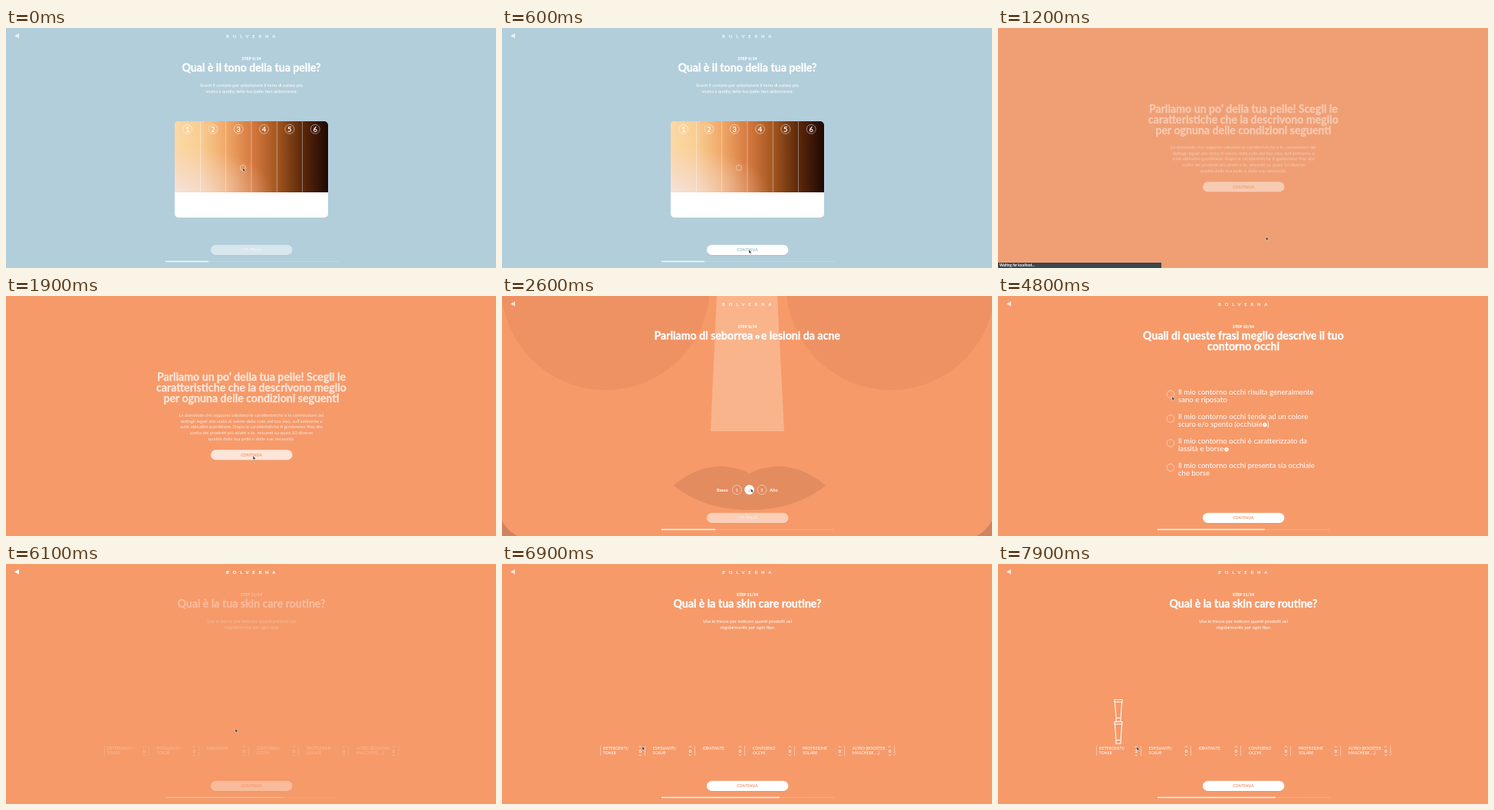
These frames come from a looping animation (639x314 px, 8 s). An HTML page:

```html
<!DOCTYPE html>
<html lang="it">
<head>
<meta charset="utf-8">
<title>Skin quiz</title>
<style>
html, body { margin: 0; width: 100%; height: 100%; overflow: hidden; background: #b2cedb; }
svg { display: block; width: 100vw; height: 100vh; }
text { font-family: Lato, "Open Sans", sans-serif; fill: #fff; white-space: pre; }
.title { font-size: 14.15px; font-weight: 700; stroke: #fff; stroke-width: .3px; }
</style>
</head>
<body>
<svg id="stage" viewBox="0 0 639 314" preserveAspectRatio="none"></svg>
<script>
const LOOP = 8000, ORANGE = '#f69a6a', PALE = '#f9b48b';
const stage = document.getElementById('stage');

// ---- markup helpers ----
const text = (x, y, size, s, o = {}) =>
  `<text x="${x}" y="${y}" font-size="${size}" font-weight="${o.w || 400}" text-anchor="${o.a || 'start'}"
    style="fill:${o.f || '#fff'};letter-spacing:${o.ls || 0}px" ${o.id ? `id="${o.id}"` : ''}>${s}</text>`;
const mid = (y, size, s, w = 400) => text(320, y, size, s, { a: 'middle', w });
const circle = (x, y, r, attrs = 'fill="#fff"') => `<circle cx="${x}" cy="${y}" r="${r}" ${attrs}/>`;
const ring = (x, y, r) => circle(x, y, r, 'fill="none" stroke="#fff" stroke-width=".6" opacity=".8"');
const rect = (x, y, w, h, attrs) => `<rect x="${x}" y="${y}" width="${w}" height="${h}" ${attrs}/>`;
const path = (d, attrs) => `<path d="${d}" ${attrs}/>`;
const group = (id, body, attrs = '') => `<g id="${id}" ${attrs}>${body}</g>`;
const each = (list, fn) => list.map(fn).join('');
const info = (x, y) => circle(x, y, 2.7) + text(x, y + 1.6, 4.4, 'i', { a: 'middle', w: 900, f: ORANGE });
const heading = (x, y, s, anchor = 'middle') => `<text class="title" x="${x}" y="${y}" text-anchor="${anchor}">${s}</text>`;
const title = (lines, y = 57.3) => each(lines, (s, i) => heading(320, y + 14 * i, s));
const note = (lines, y = 76.5, gap = 8) => each(lines, (s, i) => mid(y + gap * i, 6, s));
const step = n => mid(41.8, 5.2, `STEP ${n}/14`, 900) +
  rect(208, 305, 225, 1, 'fill="#fff" opacity=".18"') + rect(208, 304.7, 14 * n, 1.5, 'fill="#fff" opacity=".85"');
const caption = (y, f) => text(320, y + 8.5, 5.2, 'CONTINUA', { a: 'middle', w: 700, f });
const button = (id, y, color = '#ee9a70') => group(id,
  rect(267, y + .8, 106.5, 13.2, 'rx="6.6" fill="#7a4a30" opacity=".14"') +
  rect(267, y, 106.5, 13.2, 'rx="6.6" fill="#fff"') + caption(y, color));
// A disabled button carries a white caption that fades as it becomes active.
const lockedButton = (id, y, color) => button(id, y, color) + group(id + 'Hint', caption(y, '#fff'));

// ---- screens ----
function toneScreen() {
  const tones = ['#fcd9a6', '#f9cd93', '#efa868', '#d67a41', '#a4561f', '#5b280b', '#200802'];
  const edge = i => 220 + 33.3 * i;
  return `<defs>
    <linearGradient id="tones">${each(tones, (c, i) => `<stop offset="${i / 6}" stop-color="${c}"/>`)}</linearGradient>
    <radialGradient id="blush" cx="0" cy="1" r=".65"><stop stop-color="#f4e2e4" stop-opacity=".85"/>
      <stop offset="1" stop-color="#f4d8d0" stop-opacity="0"/></radialGradient>
    <clipPath id="card">${rect(220, 122, 200, 126, 'rx="5"')}</clipPath></defs>` +
    step(4) + title(['Qual è il tono della tua pelle?']) +
    note(['Scorri il cursore per selezionare il tono di colore più',
      'vicino a quello della tua pelle non abbronzata.']) +
    `<g clip-path="url(#card)">${rect(220, 122, 200, 126, 'fill="#fff"') +
      rect(220, 122, 200, 93, 'fill="url(#tones)"') + rect(220, 122, 200, 93, 'fill="url(#blush)"')}</g>` +
    each([1, 2, 3, 4, 5], i => rect(edge(i) - .3, 122, .6, 93, 'fill="#fff" opacity=".65"')) +
    each([1, 2, 3, 4, 5, 6], i => ring(edge(i - .5), 132.3, 6) +
      text(edge(i - .5), 135.7, 9.5, i, { a: 'middle', w: 700 })) +
    ring(309, 183, 3.7) + lockedButton('toneBtn', 283.8, '#9cbfcf');
}

function introScreen() {
  return title(["Parliamo un po' della tua pelle! Scegli le", 'caratteristiche che la descrivono meglio',
    'per ognuna delle condizioni seguenti'], 110.5) +
    note(['Le domande che seguono valutano le caratteristiche e le connessioni dei',
      'dettagli legati allo stato di salute della cute del tuo viso, sull’ambiente e',
      'sulle abitudini quotidiane. Dopo le caratteristiche ti guideremo fino alla',
      'scelta dei prodotti più adatti a te, misurati su quasi 10 diverse',
      'qualità della tua pelle e delle sue necessità.'], 157.7, 7.8) +
    button('introBtn', 201.3);
}

function acneScreen() {
  const pore = (x, y, strong) => strong
    ? circle(x, y, 1.2, 'fill="#b86a49" stroke="#74402c" stroke-width=".9"')
    : circle(x, y, .65, 'fill="#b06a48"');
  // y, first/last strong column, first/last faint column
  const rows = [[104, 9, 0, 3, 4], [114, 9, 0, 2, 5], [124, 3, 4, 2, 5], [134, 2, 5, 2, 6],
    [146, 2, 5, 0, 7], [156, 1, 6, 0, 7], [166, 0, 7, 0, 7]];
  const nose = each(rows, ([y, a, b, c, d]) => each([0, 1, 2, 3, 4, 5, 6, 7], i =>
    i < c || i > d ? '' : pore(282.3 + 10.3 * i, y, i >= a && i <= b)));
  const cheeks = each([242, 377], x => each([0, 1, 2], i =>
    each([157, 167, 177], y => pore(x + 10.4 * i, y, true))));
  const spots = each([0, 453], x => each([[93.5, 174], [81.5, 196.5], [106.5, 196.5]],
    ([a, y]) => circle(x + a, y, 5.2, `fill="${PALE}"`)));
  return each([135, 507], x => circle(x, -13, 136, 'fill="#ee9264"')) +
    path('M280 0H359L368 177H272Z', `fill="${PALE}"`) +
    path('M224 248C245 229 270 222 288 223C304 224 313 227 323 232.5C333 227 342 224 358 223C376 222 401 229 422 248C396 269 362 280 323 280S250 269 224 248Z', 'fill="#e38c60"') +
    path('M0 294Q7 307 20 314H0ZM639 294Q632 307 619 314H639Z', 'fill="#cf845f"') +
    step(5) + heading(198.5, 57.3, 'Parliamo di seborrea', 'start') + info(333, 53.5) +
    heading(441, 57.3, 'e lesioni da acne', 'end') +
    group('detail', nose + cheeks + spots + circle(309, 150.5, 4, 'fill="#fbc5a3"') +
      mid(208.6, 8.2, 'La mia pelle è seborroica con aspetto traslucido e presenza') +
      text(255, 218.6, 8.2, 'diffusa di brufoli (papule o pustole') + info(379.6, 216) + text(382.5, 218.6, 8.2, ')')) +
    text(280, 255.5, 5.7, 'Basso', { w: 700 }) + text(349, 255.5, 5.7, 'Alto', { w: 700 }) +
    each([1, 2, 3], i => ring(290 + 16.3 * i, 253.5, 6)) + circle(322.6, 253.5, 6.2, 'id="level" fill="#fff"') +
    each([1, 2, 3], i => text(290 + 16.3 * i, 255.8, 6.3, i, { a: 'middle', f: i == 2 ? '#f3ab84' : '#fff' })) +
    lockedButton('acneBtn', 283.8);
}

function eyeScreen() {
  const options = [['Il mio contorno occhi risulta generalmente', 'sano e riposato'],
    ['Il mio contorno occhi tende ad un colore', 'scuro e/o spento (occhiaie'],
    ['Il mio contorno occhi è caratterizzato da', 'lassità e borse'],
    ['Il mio contorno occhi presenta sia occhiaie', 'che borse']];
  return step(10) + title(['Quali di queste frasi meglio descrive il tuo', 'contorno occhi']) +
    each(options, (lines, i) => ring(225, 128.5 + 32 * i, 4.8) +
      each(lines, (s, k) => text(235, 128.6 + 32 * i + 10.6 * k, 9.6, s))) +
    info(348, 168.5) + text(351, 171.2, 9.6, ')') + info(298, 200.8) +
    circle(225, 128.5, 3, 'id="choice" fill="#fff"') + button('eyeBtn', 283.8);
}

function routineScreen() {
  const types = [['DETERGENTI/', 'TONER'], ['ESFOLIANTI/', 'SCRUB'], ['IDRATANTE'], ['CONTORNO', 'OCCHI'],
    ['PROTEZIONE', 'SOLARE'], ['ALTRO (BOOSTER,', 'MASCHERE, ...)']];
  const line = 'fill="none" stroke="#fff" stroke-width=".7"';
  const bottle = (id, y) => group(id, path(`M152 ${y}h10v3h-10zM152.4 ${y + 3}l1.6 21h6l1.6 -21M154 ${y + 24}v4.5h6v-4.5`,
    'fill="none" stroke="#fff" stroke-width="1.1"'));
  return step(11) + title(['Qual è la tua skin care routine?']) +
    note(['Usa le frecce per indicare quanti prodotti usi', 'regolarmente per ogni tipo']) +
    rect(128, 238, .6, 13, 'fill="#fff" opacity=".7"') +
    each(types, (lines, i) => {
      const x = 131.5 + 65.1 * i;
      return each(lines, (s, k) => text(x, 243 + 6.4 * k, 5.2, s)) +
        path(`M${x + 47} 240l1.7 -1.7l1.7 1.7M${x + 47} 249.3l1.7 1.7l1.7 -1.7`, line) +
        text(x + 48.7, 246.5, 5.4, 0, { a: 'middle', w: 700, id: 'count' + i }) +
        rect(x + 54.6, 238, .6, 13, 'fill="#fff" opacity=".7"');
    }) + bottle('bottle1', 206.5) + bottle('bottle2', 177.5) + button('routineBtn', 283.8);
}

stage.innerHTML = rect(0, 0, 639, 314, 'id="bg"') +
  group('tone', toneScreen()) + group('intro', introScreen()) + group('acne', acneScreen()) +
  group('eye', eyeScreen()) + group('routine', routineScreen()) +
  group('head', path('M11 10.3L17 7V13.6Z', 'fill="#fff"') +
    text(287, 13.4, 5.9, 'BOLVERNA', { w: 900, ls: 4.7 })) +
  group('status', rect(0, 307, 213, 7, 'fill="#3b464d"') + text(2, 312.3, 4.6, 'Waiting for localhost...', { w: 700 })) +
  group('cursor', path('M0 0V5L1.2 4L2.1 6L3 5.6L2.1 3.7H3.7Z', 'fill="#222" stroke="#fff" stroke-width=".5"'));

const el = {};
stage.querySelectorAll('[id]').forEach(n => el[n.id] = n);

// ---- timing ----
// Keys are [time, value...]; values between keys are interpolated.
function track(t, keys, ease = k => k) {
  const i = keys.findIndex(k => k[0] > t);
  if (i < 0) return keys[keys.length - 1].slice(1);
  if (!i) return keys[0].slice(1);
  const a = keys[i - 1], b = keys[i], k = ease((t - a[0]) / (b[0] - a[0]));
  return a.slice(1).map((v, j) => v + (b[j + 1] - v) * k);
}
const smooth = k => k * k * (3 - 2 * k);

const fades = {
  tone: [[700, 1], [950, 0]],
  intro: [[1000, 0], [1450, 1], [1850, 1], [2050, 0]],
  acne: [[2050, 0], [2400, 1], [4050, 1], [4250, 0]],
  eye: [[4250, 0], [4550, 1], [5650, 1], [5900, 0]],
  routine: [[5950, 0], [6400, 1]],
  head: [[700, .75], [950, 0], [2050, 0], [2400, .75], [5650, .75], [5900, 1], [6200, 1], [6500, .75]],
  toneBtn: [[100, .5], [350, 1]],
  toneBtnHint: [[100, 1], [350, 0]],
  acneBtn: [[2600, .52], [2950, 1]],
  acneBtnHint: [[2600, 1], [2950, 0]],
  detail: [[2600, 0], [3000, 1]],
  level: [[2400, 0], [2520, 1]],
  choice: [[4900, 0], [5000, 1]],
  bottle1: [[7050, 0], [7200, 1]],
  bottle2: [[7450, 0], [7600, 1]]
};
const moves = [[0, 309, 183], [200, 309, 183], [600, 322, 290], [800, 322, 290], [1200, 349.5, 273], [1650, 322, 208],
  [1850, 322, 208], [2350, 324.5, 252], [3600, 325.5, 252.5], [3900, 322, 290], [4100, 322, 290], [4700, 227, 131.5],
  [5000, 227, 131.5], [5450, 320, 290], [5650, 320, 290], [6100, 299, 215.5], [6300, 299, 215.5], [6950, 181, 239]];

function draw(now) {
  const t = now % LOOP;
  for (const id in fades) el[id].style.opacity = track(t, fades[id])[0];
  const rgb = track(t, [[800, 178, 206, 219], [1240, 246, 154, 106]]);
  el.bg.style.fill = `rgb(${rgb.map(Math.round)})`;
  el.status.style.opacity = t >= 800 && t < 1700 ? 1 : 0;
  el.count0.textContent = (t >= 7050) + (t >= 7450);
  el.cursor.setAttribute('transform', `translate(${track(t, moves, smooth)})`);
  requestAnimationFrame(draw);
}
draw(performance.now());
</script>
</body>
</html>
```
